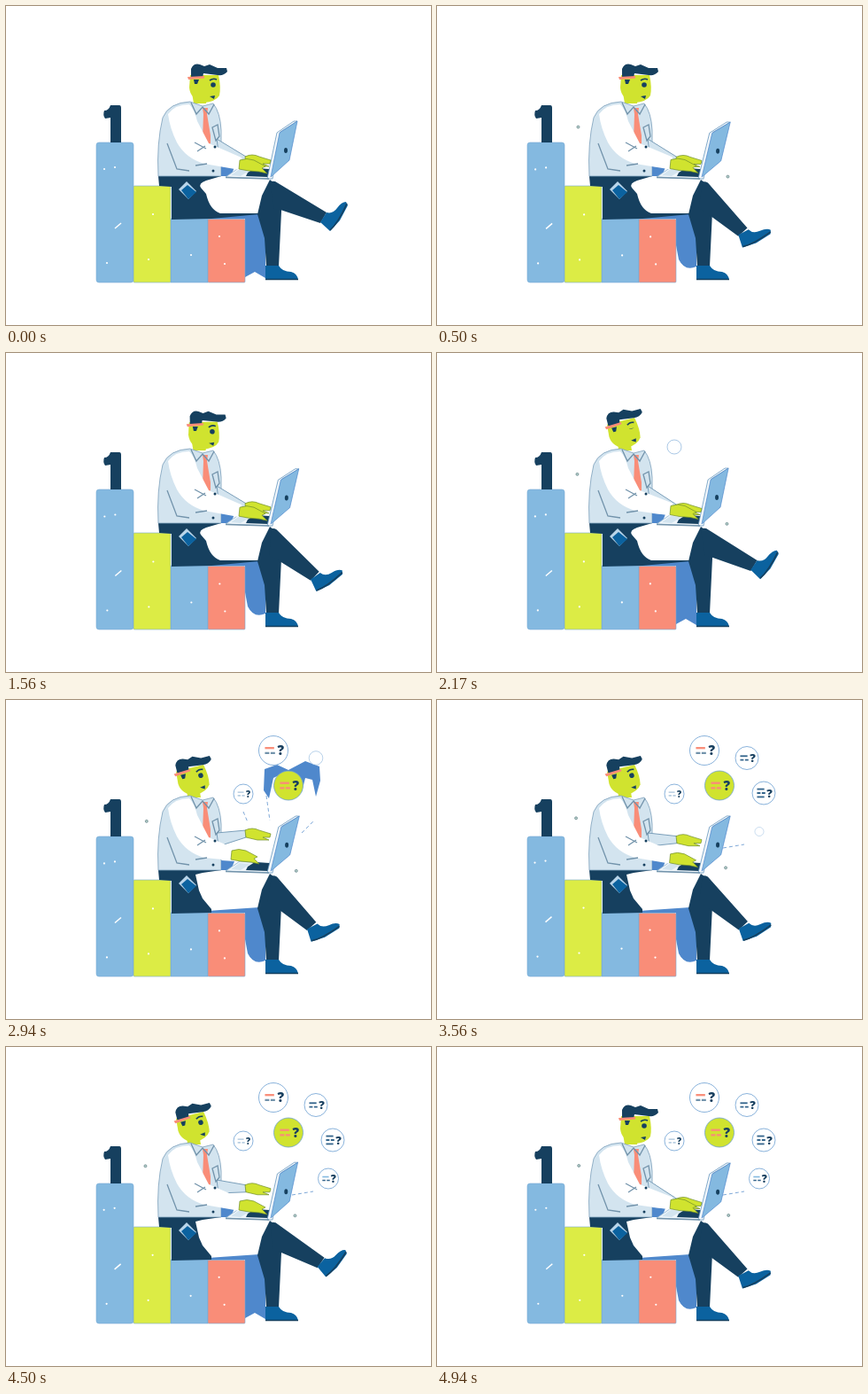
Recreate the animation shown at these times as an HTML page. Size 480x360 px, loop 5 s.

```html
<!DOCTYPE html>
<html lang="en">
<head>
<meta charset="utf-8">
<style>
  html, body { margin: 0; height: 100%; overflow: hidden; background: #fff; }
  svg { display: block; width: 480px; height: 360px; }
  text { font: 800 15px "Open Sans", sans-serif; fill: #173f5f; text-anchor: middle; }
  .navy { fill: #16405f; }
  .sky { fill: #84b9e0; }
  .lime { fill: #d0e32f; }
  .coral { fill: #f98d78; }
  .shade { fill: #4f88cc; }
  .shoe { fill: #0b629f; }
  .pale { fill: #d3e4ef; }
  .line { fill: none; stroke: #7293ab; stroke-width: 1.3; }
  .dark { fill: none; stroke: #16405f; stroke-width: 1.6; }
  .dash { fill: none; stroke: #7fa9d8; stroke-dasharray: 4 3; }
</style>
</head>
<body>
<svg viewBox="0 0 480 360">
  <path class="shade" id="shadow"/>
  <g stroke="#76a9d6" stroke-width=".6">
    <rect class="sky" x="102" y="154" width="42" height="158" rx="3"/>
    <rect class="sky" x="186" y="240" width="42" height="72"/>
    <rect x="144" y="203" width="42" height="109" rx="1" fill="#dcec45"/>
    <rect class="coral" x="228" y="240.500" width="42" height="71.500" rx="1"/>
  </g>
  <path class="navy" d="M118 154V126L112 127Q109 123 111 118Q116 118 118 112H128Q130 112 130 115V154Z"/>
  <g id="specks" fill="#fff"></g>

  <path class="navy" id="thigh"/>
  <path class="navy" d="M284 235L289 214L298 196L311 206V232L308 294H294L292 262Z"/>
  <g id="shin">
    <path class="navy" d="M298 199Q300 197 304 198L362 233L355 245L310 230L303 229Z"/>
    <g id="foot">
      <path class="shoe" d="M355 244L362 233Q369 235 374 228Q379 221 384 221L386 225L377 242L366 254Z"/>
      <path class="dark" d="M366 253Q375 245 385 223"/>
    </g>
  </g>
  <path class="shoe" d="M293 309V293H308Q312 300 322 300Q329 302 330 309Z"/>
  <path class="dark" d="M293 308.500H330"/>
  <path fill="#b9d5ea" d="M195 207L204 198L215 209L206 218Z"/>
  <path class="shoe" d="M198 208L205 202L215 210L206 218Z"/>

  <path class="lime" id="neck"/>
  <path class="pale" stroke="#7b9fba" stroke-width=".8"
    d="M172 192Q170 155 177 126Q184 109 208 108L222 113L234 110Q242 120 243 140V192Z"/>
  <path class="pale" id="rearArm" stroke="#7b9fba"/>
  <path class="shade" d="M243 181L258 182L254 192H243Z"/>
  <path fill="#eef5fa" stroke="#8fb3cf" stroke-width=".8" d="M248 193L264 182L299 185L297 195Z"/>
  <path class="navy" d="M273 188L281 183L298 184L296 193L271 192Z"/>
  <path class="pale" d="M254 191L264 184L276 185L265 192Z"/>
  <g id="laptop">
    <path fill="#f3f8fb" stroke="#6998bf" stroke-width=".8" d="M295 195L306 143L325 130L329 130L310 142L301 195Z"/>
    <path class="sky" stroke="#4f88cc" stroke-width=".7" d="M299 193L309 143L329 130L320 174Z"/>
    <ellipse class="navy" cx="316" cy="163" rx="2" ry="3"/>
  </g>
  <path class="line" d="M248 193.500L297 195" stroke-width="1"/>

  <path class="lime" id="rearHand" stroke="#6f8d2c" stroke-width=".7"
    d="M270 167Q278 163 286 167L299 171L298 175L290 175L297 178L284 178L271 175Z"/>
  <path class="coral" d="M222 115H228L227 122L231 146V155L227 158L222 150L223 122Z"/>
  <path id="sleeve" fill="#fff"/>
  <path class="lime" id="frontHand" stroke="#6f8d2c" stroke-width=".7"
    d="M264 174Q272 171 280 174L293 181L289 183L295 189L286 187L274 186L263 184Z"/>
  <path class="line" d="M182 155L193 184L207 186M213 154L226 161M216 164L225 158M233 137L239 134L241 147L237 152Z
    M214 180L227 178M209 109L215 122L222 114L229 122L235 111"/>
  <g class="navy"><circle cx="236" cy="159" r="1.500"/><circle cx="234" cy="186" r="1.500"/></g>

  <g id="head">
    <path class="lime" d="M208 78H240Q243 92 241 101Q237 108 223 109Q208 105 207 92Z"/>
    <path class="navy" d="M209 80V71Q212 64 219 66L224 68L230 66L239 70H249L250 74Q246 79 239 78L223 76L222 81Z"/>
    <path class="coral" d="M205 80L224 79V81.500L206 83Z"/>
    <path class="navy" d="M212 83H218L216 88H213Z"/>
    <circle class="navy" id="eye" cx="234" cy="89" r="2.800"/>
    <path class="dark" d="M230 84Q234 81 238 83"/>
    <path class="navy" d="M230 102L236 101L235 105Z"/>
  </g>

  <g id="surprise">
    <path class="shade" d="M291 102L292 78L306 73L319 79L338 69L354 75L355 91L350 109L346 90L338 88L334 104
      L318 80L302 88L297 111Z"/>
    <path class="dash" d="M268 126L273 138M294 108L298 136M334 150L347 137"/>
  </g>
  <path class="dash" id="trail" d="M323 167L347 163"/>
  <g id="bubbles"></g>
  <g id="motes" fill="#b5cfc9" stroke="#5f7f86" stroke-width=".7">
    <circle cx="159" cy="135" r="1.500"/><circle cx="328" cy="191" r="1.500"/>
  </g>
</svg>
<script>
const LOOP = 5000, SWING = 715;
const el = id => document.getElementById(id);
const set = (id, name, value) => el(id).setAttribute(name, value);
const show = (id, on) => set(id, "visibility", on ? "visible" : "hidden");
const clamp = x => Math.min(1, Math.max(0, x));
const ramp = (t, from, to) => {
  const p = clamp((t - from) / (to - from));
  return p * p * (3 - 2 * p);
};

// start time, centre, radius, mark size, bar colours from top to bottom
const bubbles = [
  [2048, 268, 106, 11, 10, ["#b9cfe2", "#b9cfe2"]],
  [2330, 302, 57, 16.5, 15, ["#f98d78", "#7293ab"]],
  [2600, 319, 96.5, 16.5, 15, ["#f98d78", "#f98d78"], "#d0e32f"],
  [2849, 350, 65.5, 13, 13, ["#34658c", "#34658c"]],
  [3250, 369, 105, 13, 13, ["#34658c", "#34658c", "#34658c"]],
  [3500, 364, 148.5, 11.5, 12, ["#84b9e0", "#34658c"]]
];
el("bubbles").innerHTML = bubbles.map(([, , , r, size, bars, fill = "#fff"]) => {
  const rows = bars.map((color, i) => {
    const y = (i - (bars.length - 1) / 2) * r * .34;
    const dashes = i % 2 ? `${r * .3} 1.5` : "none";
    return `<path d="M${-r * .58} ${y}H${r * (i % 2 ? .15 : .05)}" stroke="${color}"
      stroke-width="${r * .14}" stroke-dasharray="${dashes}"/>`;
  }).join("");
  return `<g><circle r="${r}" fill="${fill}" stroke="#6da0d2" stroke-width=".8"/>
    <g>${rows}<text x="${r * .5}" y="${size * .35}" style="font-size:${size}px">?</text></g></g>`;
}).join("");

const specks = [[111, 184], [123, 182], [114, 290], [166, 235], [161, 286], [209, 281], [241, 260], [247, 291]];
el("specks").innerHTML = '<path d="M123 251L130 245" stroke="#fff" stroke-width="1.500"/>' +
  specks.map(([x, y]) => `<circle cx="${x}" cy="${y}" r="1.100"/>`).join("");

// The foot swings, rests low during the surprise, then swings again.
const swing = t => ((1 + Math.cos(2 * Math.PI * t / SWING)) / 2) ** 4;
function footLift(t) {
  if (t < 3.5 * SWING) return swing(t);
  const since = t - 4440;
  if (since < -1.5 * SWING) return 0;
  return swing(since) * (since < -SWING / 2 ? .45 : 1);
}

function draw(t) {
  const lift = footLift(t);
  set("shin", "transform", `rotate(${18 * (1 - lift)} 300 205)`);
  set("foot", "transform", `rotate(${12 * (1 - lift)} 357 242)`);
  set("laptop", "transform", `rotate(${2 * (1 - lift)} 298 195)`);

  set("shadow", "d", "M187 241L242 237L286 234L293 262" + (lift > .5
    ? "V307L281 300L270 306V240Z"
    : "V294Q280 300 273 286L270 270V240Z"));
  const hole = t > 700 && t < 1250
    ? "232 205Q240 217 262 219Q280 224 286 234L240 238"
    : t > 2700
      ? "222 195L214 197L218 215L222 224L232 236V240"
      : "226 197Q217 200 220 205L226 212Q230 230 242 234L286 234V235L232 240";
  set("thigh", "d", `M172 192H243L${hole}L187 241V204L173 203Z`);

  const look = ramp(t, 1450, 2100) - ramp(t, 4550, 4750);
  set("head", "transform", `translate(${-13 * look} ${-look}) rotate(${-14 * look} 222 92)`);
  set("neck", "d", `M${210 - 6 * look} 98H${228 - 10 * look}L${226 - 6 * look} 110H${212 - 7 * look}Z`);
  set("eye", "transform", t > 2120 && t < 2230 ? "translate(0 80.100) scale(1 .1)" : "");

  const gesture = ramp(t, 2600, 2850) - ramp(t, 4450, 4700);
  const startle = ramp(t, 2650, 2850) - ramp(t, 3300, 3600);
  const tap = 1.5 * Math.sin(t / 55) * (1 - gesture);
  const rearY = 3 + tap - 16 * gesture - 7 * startle;
  const armX = -9 * startle, armY = -4 * startle - tap;
  set("rearHand", "transform", `translate(0 ${rearY})`);
  set("frontHand", "transform", `translate(${armX} ${armY})`);
  set("rearArm", "d", `M238 150L271 ${167 + rearY}V${175 + rearY}L240 165Z`);
  set("sleeve", "d", `M183 122Q191 111 207 111Q213 117 216 130L229 155L${266 + armX} ${171 + armY}
    L${264 + armX} ${185 + armY}L224 178Q203 172 193 154Q185 138 183 122Z`);

  bubbles.forEach(([start, x, y], i) => {
    const group = el("bubbles").children[i];
    const size = 1 - (1 - clamp((t - start) / 350)) ** 3;
    group.setAttribute("transform", `translate(${x} ${y}) scale(${size})`);
    group.lastElementChild.setAttribute("visibility", size > .9 ? "visible" : "hidden");
  });
  show("surprise", t > 2830 && t < 3060);
  show("trail", t > 3500);

  const step = Math.floor(t / 110);
  const dx = 2 * Math.sin(step * 2.3), dy = 2 * Math.sin(step * 3.7);
  set("motes", "transform", `translate(${dx} ${dy})`);
  show("motes", t > 300 && (t < 1300 || t > 1800));
  set("specks", "transform", `translate(${dx / 4} ${dy / 4})`);
}

const began = performance.now();
function tick() {
  draw((performance.now() - began) % LOOP);
  requestAnimationFrame(tick);
}
tick();
</script>
</body>
</html>
```
